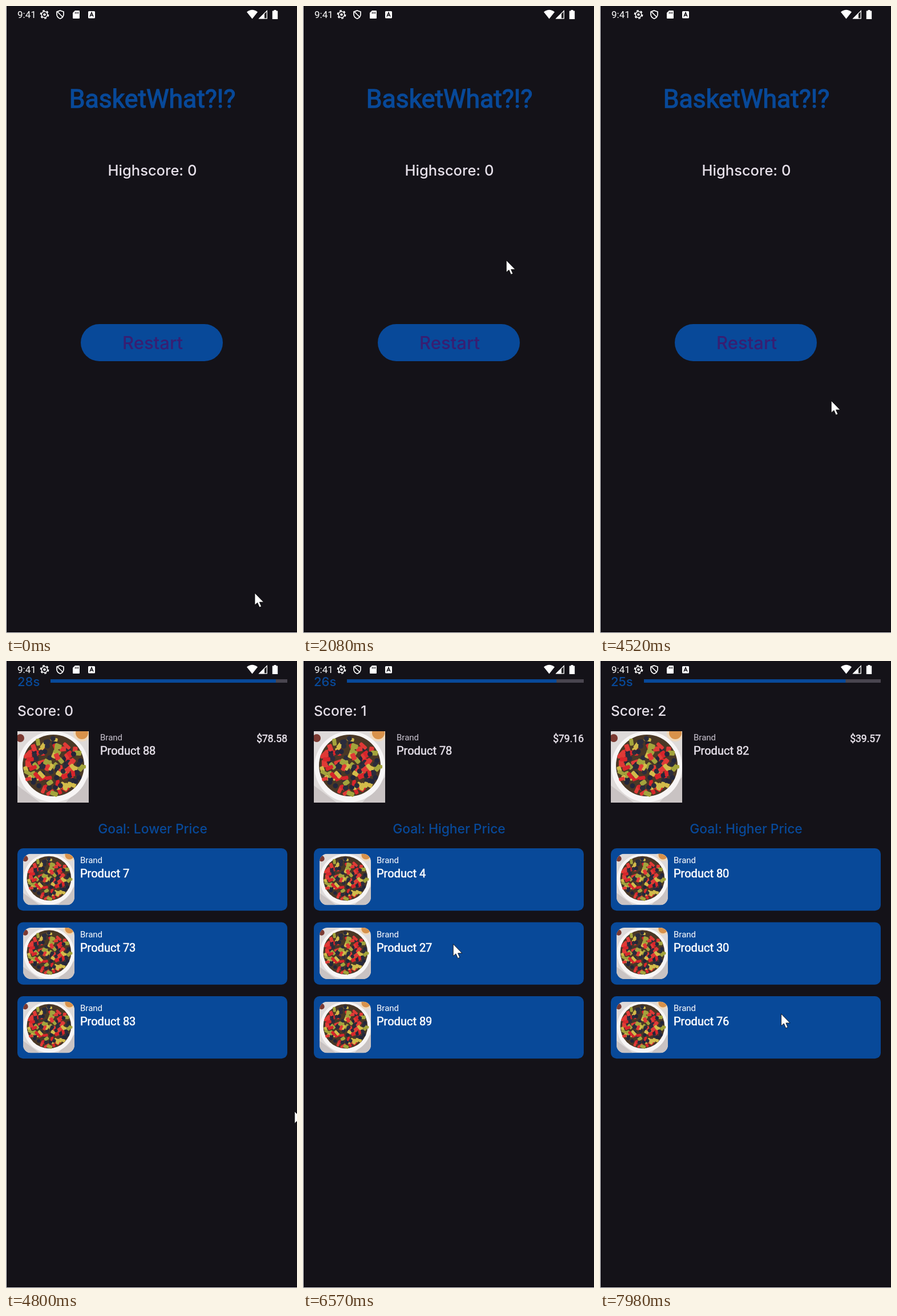
Write an HTML page that moves like this. It is 510 px wide and 1098 px high and loops after 8 s.

```html
<!DOCTYPE html>
<html lang="en">
<head>
<meta charset="utf-8">
<title>Price game</title>
<style>
  html, body { margin: 0; width: 100%; height: 100%; overflow: hidden; background: #141218; }
  svg { display: block; }
  #stage { width: 100%; height: 100%; }
  text { font-family: Roboto, sans-serif; fill: currentColor; color: #fff; }
  .wide { font-family: Inter, sans-serif; font-weight: 500; }
  .bold { stroke: currentColor; stroke-width: .55px; }
  .mid { text-anchor: middle; }
  .end { text-anchor: end; }
  .blue { color: #084999; }
  .soft { color: #e6e0e9; }
  .dim { color: #cac4d0; }
  .brand { font-size: 15px; }
  .product { font-size: 20px; }
  .fill { fill: #084999; }
</style>
</head>
<body>
<svg id="stage" viewBox="0 0 510 1098">
  <defs>
    <symbol id="bowl" viewBox="0 0 125 125">
      <rect width="125" height="125" fill="#dedad9"/>
      <path d="M0 95L40 125H0ZM125 80V125H85Z" fill="#c9c3c3"/>
      <circle cx="5" cy="12" r="7" fill="#7c3a32"/>
      <circle cx="113" cy="3" r="15" fill="#efd9bd"/>
      <circle cx="113" cy="3" r="11" fill="#d8924b"/>
      <circle cx="63" cy="62" r="62" fill="#f7f5f5"/>
      <circle cx="63" cy="60" r="54" fill="#4a3826"/>
      <g id="fruit"></g>
    </symbol>
    <clipPath id="buttonClip"><rect x="131" y="557" width="249" height="65" rx="32.5"/></clipPath>
    <clipPath id="photoClip"><rect x="30" y="337.5" width="90" height="90" rx="14"/></clipPath>
  </defs>

  <rect width="510" height="1098" fill="#141218"/>

  <g id="menu">
    <text class="blue bold mid" x="256.5" y="178" font-size="44.5" style="stroke-width:1.3px">BasketWhat?!?</text>
    <text class="wide soft mid" x="256.5" y="297" font-size="25.5">Highscore: 0</text>
    <rect class="fill" x="131" y="557" width="249" height="65" rx="32.5"/>
    <circle id="ripple" cx="235" cy="581" fill="#381e72" clip-path="url(#buttonClip)"/>
    <text class="wide mid" x="257" y="601" font-size="31" style="color:#381e72">Restart</text>
  </g>

  <g id="game">
    <rect width="512" height="1098" fill="#141218"/>
    <text id="timer" class="wide blue" x="20" y="43.5" font-size="22"></text>
    <rect x="78" y="32" width="415" height="6" fill="#49454f"/>
    <rect id="bar" class="fill" x="78" y="32" height="6"/>
    <text id="score" class="wide soft" x="20" y="96" font-size="24.5"></text>
    <use href="#bowl" x="20" y="123" width="125" height="125"/>
    <text class="brand dim" x="165" y="139">Brand</text>
    <text id="product" class="product bold soft" x="165" y="164"></text>
    <text id="price" class="bold soft end" x="493" y="142" font-size="17.5"></text>
    <text id="goal" class="wide blue mid" x="257" y="301.5" font-size="22.8"></text>
    <g id="cards"></g>
  </g>

  <g id="status" fill="#fff">
    <text x="20" y="21" font-size="17">9:41</text>
    <g fill="none" stroke="#fff">
      <circle cx="67.5" cy="15" r="5.3" stroke-width="1.6"/>
      <circle cx="67.5" cy="15" r="6.9" stroke-width="2" stroke-dasharray="3.6 3.62"/>
      <path d="M95 8L101 10.2V14.5Q101 19.8 95 22.2Q89 19.8 89 14.5V10.2ZM90.5 10.5L99.5 19.5" stroke-width="1.7"/>
    </g>
    <circle cx="67.5" cy="15" r="2.3"/>
    <path d="M121 8H128Q129 8 129 9V21Q129 22 128 22H118Q117 22 117 21V12Z"/>
    <path d="M121.5 10.5V13.5M124 10.5V13.5M126.5 10.5V13.5" stroke="#141218" stroke-width="1.2"/>
    <rect x="144" y="9" width="12" height="12.5" rx="1.5"/>
    <path d="M147 18.5L150 11.5L153 18.5M148 16.3H152" fill="none" stroke="#141218" stroke-width="1.5"/>
    <path d="M422 10.5Q431.5 3 441 10.5L431.5 22.5Z"/>
    <path d="M444 21.8H457.3V8.5Z" fill="none" stroke="#fff" stroke-width="1.3"/>
    <path d="M443 22.3H453V12.5Z"/>
    <path d="M469.5 7H473.5V8.6H476.2V23H466.8V8.6H469.5Z"/>
  </g>

  <path id="cursor" d="M0 0V21L4.7 17L8.2 25L11.6 23.5L8.3 16H15.6Z" fill="#fff" stroke="#000" stroke-width=".8"/>
  <circle id="click" cx="-1" cy="-1" r="17" fill="#ff0" fill-opacity=".48"/>
  <path d="M.5 0V1097.5H510" fill="none" stroke="#e4e4e6"/>
</svg>

<script>
const LOOP = 8000, GAME_START = 4570, FADE = 180;
const REST = { pass: 0, pause: 180, press: 320 };
const PRESS_DELAY = 150, PRESS_TIME = 130;
const $ = id => document.getElementById(id);
const clamp = v => Math.max(0, Math.min(1, v));

// arrival time, x, y of the pointer tip, what it does there
const stops = [
  [0, 436, 1028, "pass"], [410, 220, 617, "pause"], [760, 235, 581, "press"],
  [1700, 305, 745, "pause"], [2080, 356, 446, "pass"], [2390, 443, 392, "pause"],
  [2960, 286, 562, "press"], [3540, 487, 684, "pause"], [3950, 450, 738, "pass"],
  [4300, 366, 680, "pass"], [4520, 405, 691, "pass"], [4800, 506, 789, "pass"],
  [5270, 285, 415, "press"], [5950, 248, 485, "pass"], [6200, 262, 495, "press"],
  [7050, 309, 521, "press"], [7690, 310, 665, "pause"], [LOOP, 318, 615, "pass"]
];
const path = stops.flatMap(([t, x, y, act]) =>
  act === "pass" ? [[t, x, y]] : [[t, x, y], [t + REST[act], x, y]]);
const presses = stops.filter(s => s[3] === "press").map(s => s[0] + PRESS_DELAY);

const rounds = [
  { score: 0, goal: "Lower", product: 88, price: "78.58", choices: [7, 73, 83] },
  { score: 1, goal: "Lower", product: 10, price: "69.79", choices: [29, 11, 23] },
  { score: 1, goal: "Higher", product: 78, price: "79.16", choices: [4, 27, 89] },
  { score: 2, goal: "Higher", product: 82, price: "39.57", choices: [80, 30, 76] }
];

function drawFruit() {
  let seed = 4127;
  const rnd = () => (seed = seed * 16807 % 2147483647) / 2147483647;
  const colors = ["#d8252b", "#23263a", "#d2bb4a", "#2b2c3c", "#e03a36", "#a3a43c"];
  const count = 130;
  let shapes = "";
  for (let i = 0; i < count; i++) {
    const r = 50 * Math.sqrt((i * 47 % count + .5) / count), a = rnd() * 2 * Math.PI;
    const kind = Math.floor(rnd() * colors.length), berry = kind % 2 && kind < 5;
    const w = berry ? 9 : 10 + 5 * rnd(), h = berry ? 9 : 6 + 3 * rnd();
    shapes += `<rect x="${-w / 2}" y="${-h / 2}" width="${w}" height="${h}" rx="${berry ? 4.5 : 2}"
      fill="${colors[kind]}" transform="translate(${63 + r * Math.cos(a)} ${60 + r * Math.sin(a)}) rotate(${rnd() * 180})"/>`;
  }
  $("fruit").innerHTML = shapes;
}

function drawCards() {
  $("cards").innerHTML = [0, 1, 2].map(i => `<g transform="translate(0 ${i * 129.5})">
    <rect class="fill" x="20" y="328" width="473" height="109.2" rx="10"/>
    <g clip-path="url(#photoClip)"><use href="#bowl" x="30" y="337.5" width="90" height="90"/></g>
    <text class="brand" x="130" y="354">Brand</text>
    <text class="product bold choice" x="130" y="379"></text></g>`).join("");
}

// Slope of one coordinate at a path point; zero beside a rest.
function slope(i, axis) {
  const a = path[i - 1], b = path[i], c = path[i + 1];
  if (!a || !c) return 0;
  const rests = (p, q) => p[1] === q[1] && p[2] === q[2];
  return rests(a, b) || rests(b, c) ? 0 : (c[axis] - a[axis]) / (c[0] - a[0]);
}

function pointer(t) {
  const i = Math.max(0, path.findIndex(p => p[0] > t) - 1);
  const a = path[i], b = path[i + 1], span = b[0] - a[0], u = (t - a[0]) / span;
  const ease = u * u * (3 - 2 * u);
  return [1, 2].map(axis => a[axis] + (b[axis] - a[axis]) * ease
    + span * (slope(i, axis) * u * (1 - u) ** 2 - slope(i + 1, axis) * u * u * (1 - u)));
}

function setText(el, value) {
  if (el.textContent !== value) el.textContent = value;
}

function drawGame(t) {
  const picks = presses.filter(p => p > GAME_START && p + PRESS_TIME <= t).length;
  const { score, goal, product, price, choices } = rounds[picks];
  const seconds = Math.min(28, 32 - Math.floor((t - 50) / 1000));
  $("game").setAttribute("transform", `translate(${seconds < 28 ? -1 : 0} 0)`);
  setText($("timer"), seconds + "s");
  $("bar").setAttribute("width", 415 * (seconds + .55) / 30);
  setText($("score"), "Score: " + score);
  setText($("product"), "Product " + product);
  setText($("price"), "$" + price);
  setText($("goal"), `Goal: ${goal} Price`);
  document.querySelectorAll(".choice").forEach((el, i) => setText(el, "Product " + choices[i]));
}

function draw(t) {
  const at = `translate(${pointer(t).map(v => v.toFixed(2)).join(" ")})`;
  const pressed = presses.some(p => t >= p && t < p + PRESS_TIME);
  const sinceStart = t - presses[0];
  $("cursor").setAttribute("transform", at);
  $("click").setAttribute("transform", at);
  $("click").style.visibility = pressed ? "visible" : "hidden";
  $("ripple").setAttribute("r", 30 + 130 * clamp(sinceStart / 225));
  $("ripple").style.opacity = sinceStart < 0 ? 0 : .14 * clamp((400 - sinceStart) / 180);
  $("game").style.opacity = clamp((t - GAME_START) / FADE);
  drawGame(t);
}

drawFruit();
drawCards();
const start = performance.now();
function frame() {
  draw((performance.now() - start) % LOOP);
  requestAnimationFrame(frame);
}
frame();
</script>
</body>
</html>
```
